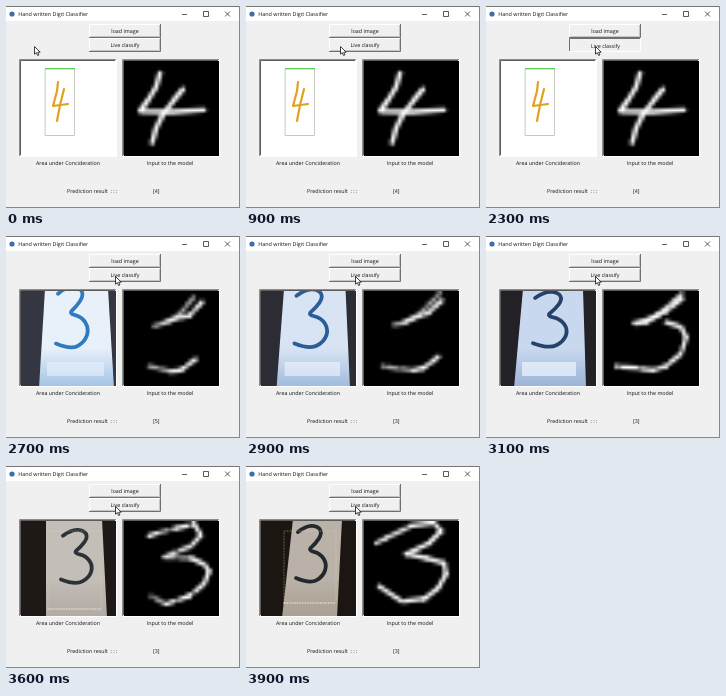
Animation, 234 px wide and 202 px high, one loop 4000 ms. Source, as an HTML page with a canvas:

```html
<!DOCTYPE html>
<html lang="en">
<head>
<meta charset="utf-8">
<title>Hand written Digit Classifier</title>
<style>
  html, body { margin: 0; width: 100%; height: 100%; overflow: hidden; background: #f0f0f0; }
  svg, canvas { position: absolute; display: block; }
  #ui { left: 0; top: 0; }
  #ui text { font: 5.35px "Open Sans", "Noto Sans", sans-serif; fill: #111; text-rendering: geometricPrecision; }
  .mid { text-anchor: middle; }
  #photo, #model { width: 95px; height: 95px; top: 55px; }
  #photo { left: 15px; }
  #model { left: 118px; }
  #pointer { left: 0; top: 0; animation: move 4s step-end infinite; }
  @keyframes move {
    0% { transform: translate(28px, 40px); }
    17.5% { transform: translate(38px, 40px); }
    20% { transform: translate(66px, 40px); }
    22.5% { transform: translate(94px, 40px); }
    25% { transform: translate(107px, 40px); }
    30% { transform: translate(108px, 41px); }
    40% { transform: translate(109px, 41px); }
    42.5%, 100% { transform: translate(109px, 40px); }
  }
  .up { animation: up 4s step-end infinite; }
  .down { animation: down 4s step-end infinite; }
  @keyframes up { 0% { opacity: 1; } 57.5% { opacity: 0; } 67.5%, 100% { opacity: 1; } }
  @keyframes down { 0% { opacity: 0; } 57.5% { opacity: 1; } 67.5%, 100% { opacity: 0; } }
</style>
</head>
<body>
<svg id="ui" width="234" height="202" viewBox="0 0 234 202">
  <defs>
    <g id="raised" fill="none">
      <path d="M.5 13.5V.5H71.5" stroke="#fff"/>
      <path d="M1.5 12.5H70.5V1" stroke="#c4c4c4"/>
      <path d="M0 13.5H71.5V0" stroke="#707070"/>
    </g>
    <g id="sunken" fill="none">
      <path d="M.5 13.5V.5H71.5" stroke="#707070"/>
      <path d="M0 13.5H71.5V0" stroke="#fff"/>
    </g>
    <g id="well" fill="none">
      <path d="M.5 97V.5H97" stroke="#8c8c8c"/>
      <path d="M1.5 96V1.5H96" stroke="#5c5c5c"/>
      <path d="M0 97.5H97.5V0" stroke="#fff"/>
    </g>
  </defs>
  <rect width="234" height="202" fill="#f0f0f0"/>
  <rect width="234" height="15" fill="#fff"/>
  <path d="M0 .5H234" stroke="#777"/>
  <path d="M233.5 0V202M0 201.5H234" stroke="#888" fill="none"/>
  <circle cx="6" cy="8" r="2.6" fill="#3d6ea8"/>
  <text x="12.3" y="10.2" style="font-size:5.4px">Hand written Digit Classifier</text>
  <path d="M176 8.5h5M197.5 5.5h5v5h-5zM219 5.5l5 5m0-5l-5 5" fill="none" stroke="#333" stroke-width=".8"/>
  <use href="#raised" x="83" y="18"/>
  <text class="mid" x="119" y="27.2">load image</text>
  <g class="up">
    <use href="#raised" x="83" y="32"/>
    <text class="mid" x="119" y="41.2">Live classify</text>
  </g>
  <g class="down">
    <use href="#sunken" x="83" y="32"/>
    <text class="mid" x="119.5" y="41.7">Live classify</text>
  </g>
  <use href="#well" x="13" y="53"/>
  <use href="#well" x="116" y="53"/>
  <text class="mid" x="62" y="159">Area under Concideration</text>
  <text class="mid" x="164" y="159">Input to the model</text>
  <text x="61" y="187">Prediction result</text>
  <text x="104.5" y="187">: : :</text>
  <text id="result" x="147" y="187">[4]</text>
</svg>
<canvas id="photo" width="95" height="95"></canvas>
<canvas id="model" width="28" height="28"></canvas>
<svg id="pointer" width="8" height="11" viewBox="0 0 8 11">
  <path d="M.5.5V8.2L2.3 6.6 3.6 9.5 4.9 8.9 3.7 6.2H6.2Z" fill="#fff" stroke="#111" stroke-width=".8"/>
</svg>
<script>
const photo = document.getElementById('photo').getContext('2d');
const model = document.getElementById('model').getContext('2d');
const result = document.getElementById('result');

// The handwritten 3 in a unit box
const three = [[.06, .12], [.32, .01], [.72, .02], [.84, .15], [.62, .32], [.38, .43],
  [.78, .48], [1, .66], [.88, .87], [.45, 1], [0, .9]];

// sides: page x at top left, top right, bottom left, bottom right
// guide: detection box x, y, w, h, opacity; line: what the model sees; on: strength per segment
const poses = [
  { at: 2700, sides: [24, 87, 18, 93], back: [52, 54, 66], page: [232, 240, 250], low: [164, 196, 228],
    ink: [48, 122, 196], box: [35, -5, 33, 64], guide: [22, 5, 66, 66, 0], panel: .5,
    line: [[30, 35], [40, 32], [54, 25], [72, 3], [78, 11], [66, 24], [44, 30], [60, 33], [80, 42],
      [82, 56], [72, 68], [57, 79], [46, 80], [25, 75]], on: '6760980000996', dash: [3, 1.2] },
  { at: 3100, sides: [22, 82, 13, 85], back: [36, 33, 38], page: [200, 216, 238], low: [156, 180, 214],
    ink: [38, 66, 106], box: [32, 0, 35, 58], guide: [22, 8, 60, 66, .1], panel: .7,
    line: [[30, 32], [42, 31], [54, 24], [79, 2], [78, 8], [62, 20], [32, 33], [62, 31], [77, 36],
      [82, 46], [77, 63], [62, 75], [50, 79], [12, 75]], on: '8980980999989', dash: [4, 1.3] },
  { at: 3300, sides: [23, 82, 13, 81], back: [30, 27, 32], page: [178, 188, 208], low: [136, 148, 174],
    ink: [34, 46, 70], box: [33, 5, 33, 56], guide: [24, 8, 56, 64, .5], panel: .15,
    line: [[30, 32], [44, 31], [56, 22], [80, 2], [78, 8], [60, 23], [30, 33], [65, 29], [82, 35],
      [82, 53], [70, 70], [52, 79], [34, 76], [10, 72]], on: '9990999099999', dash: [] },
  { at: 3600, sides: [25, 81, 25, 86], back: [30, 25, 22], page: [196, 190, 184], low: [178, 170, 164],
    ink: [44, 50, 56], box: [40, 8, 32, 56], guide: [27, 10, 53, 78, .8], panel: 0,
    line: [[25, 15], [33, 12], [52, 7], [70, 3], [77, 14], [67, 25], [40, 36], [67, 37], [80, 43],
      [85, 50], [80, 63], [65, 75], [42, 83], [27, 75]], on: '9699986999996', dash: [3.4, 1.4] },
  { at: 3900, sides: [32, 81, 21, 76], back: [28, 22, 18], page: [186, 178, 168], low: [170, 160, 148],
    ink: [36, 40, 44], box: [35, 4, 31, 59], guide: [23, 10, 52, 72, .9], panel: 0,
    line: [[12, 22], [22, 17], [47, 5], [70, 2], [77, 10], [65, 22], [42, 33], [62, 37], [80, 42],
      [82, 53], [74, 67], [60, 78], [37, 80], [15, 65]], on: '8899999999999', dash: [6, 1] }
];

const mix = (a, b, k) => Array.isArray(a) ? a.map((v, i) => mix(v, b[i], k)) : a + (b - a) * k;
const rgb = c => `rgb(${c.map(Math.round)})`;

function poseAt(t) {
  let i = poses.length - 1;
  while (i && poses[i].at > t) i--;
  const a = poses[i], b = poses[i + 1] || a;
  const k = a === b ? 0 : (t - a.at) / (b.at - a.at);
  const p = { on: a.on, dash: a.dash };
  for (const key of ['sides', 'back', 'page', 'low', 'ink', 'box', 'guide', 'panel', 'line']) p[key] = mix(a[key], b[key], k);
  return p;
}

function poly(c, pts) {
  c.beginPath();
  pts.forEach(([x, y]) => c.lineTo(x, y));
  c.stroke();
}

function curve(c, pts) {
  c.beginPath();
  c.moveTo(...pts[0]);
  for (let i = 1; i < pts.length - 1; i++) {
    const end = i === pts.length - 2 ? pts[i + 1] : mix(pts[i], pts[i + 1], .5);
    c.quadraticCurveTo(...pts[i], ...end);
  }
  c.stroke();
}

function pen(c, color, width, dash = []) {
  c.strokeStyle = color;
  c.lineWidth = width;
  c.lineCap = c.lineJoin = 'round';
  c.setLineDash(dash);
}

function clearModel() {
  model.setTransform(1, 0, 0, 1, 0, 0);
  model.fillStyle = '#000';
  model.fillRect(0, 0, 28, 28);
  model.scale(28 / 95, 28 / 95);
}

function drawFour() {
  photo.fillStyle = '#fff';
  photo.fillRect(0, 0, 95, 95);
  pen(photo, '#c8c8c8', 1);
  photo.strokeRect(24.5, 7.5, 29, 67);
  photo.fillStyle = '#5fd35a';
  photo.fillRect(24, 7, 30, 1.4);
  pen(photo, '#e0a020', 2.2);
  poly(photo, [[37, 21], [36, 30], [32, 45], [47, 43]]);
  poly(photo, [[43, 28], [39, 44], [36, 60]]);
  clearModel();
  pen(model, '#fff', 4.6);
  poly(model, [[36, 12], [32, 26], [24, 39], [16, 50], [48, 51], [80, 49]]);
  poly(model, [[59, 28], [49, 40], [39, 53], [32, 67], [28, 82]]);
}

function drawPage(p) {
  const [tl, tr, bl, br] = p.sides;
  photo.fillStyle = rgb(p.back);
  photo.fillRect(0, 0, 95, 95);
  const light = photo.createLinearGradient(0, 0, 0, 95);
  light.addColorStop(0, rgb(p.page));
  light.addColorStop(.6, rgb(p.page));
  light.addColorStop(1, rgb(p.low));
  photo.fillStyle = light;
  photo.filter = 'blur(.7px)';
  photo.beginPath();
  [[tl, -2], [tr, -2], [br, 97], [bl, 97]].forEach(q => photo.lineTo(...q));
  photo.fill();
  photo.fillStyle = `rgba(240,246,255,${p.panel})`;
  photo.fillRect(bl + 8, 71, br - bl - 18, 14);
  const [x, y, w, h] = p.box;
  pen(photo, rgb(p.ink), 3.8);
  curve(photo, three.map(([u, v]) => [x + u * w, y + v * h]));
  photo.filter = 'none';
  const [gx, gy, gw, gh, alpha] = p.guide;
  pen(photo, `rgba(236,222,160,${alpha * .45})`, 1, [1, 2]);
  poly(photo, [[gx, gy + gh], [gx, gy], [gx + gw, gy], [gx + gw, gy + gh]]);
  pen(photo, `rgba(250,240,200,${alpha})`, 1, [1, 1.6]);
  poly(photo, [[gx, gy + gh], [gx + gw, gy + gh]]);
}

function drawLine(p) {
  clearModel();
  [...p.on].forEach((s, i) => {
    if (s === '0') return;
    pen(model, `rgba(255,255,255,${s / 9})`, 4.2, p.dash.map(d => d * 3.4));
    poly(model, [p.line[i], p.line[i + 1]]);
  });
}

let last = -1;
function tick(now) {
  const t = Math.floor(now % 4000 / 100) * 100;
  if (t !== last) {
    last = t;
    if (t < 2700) {
      drawFour();
      result.textContent = '[4]';
    } else {
      const p = poseAt(t);
      drawPage(p);
      drawLine(p);
      result.textContent = t < 2900 || t === 3300 || t === 3400 ? '[5]' : '[3]';
    }
  }
  requestAnimationFrame(tick);
}
drawFour();
requestAnimationFrame(tick);
</script>
</body>
</html>
```
